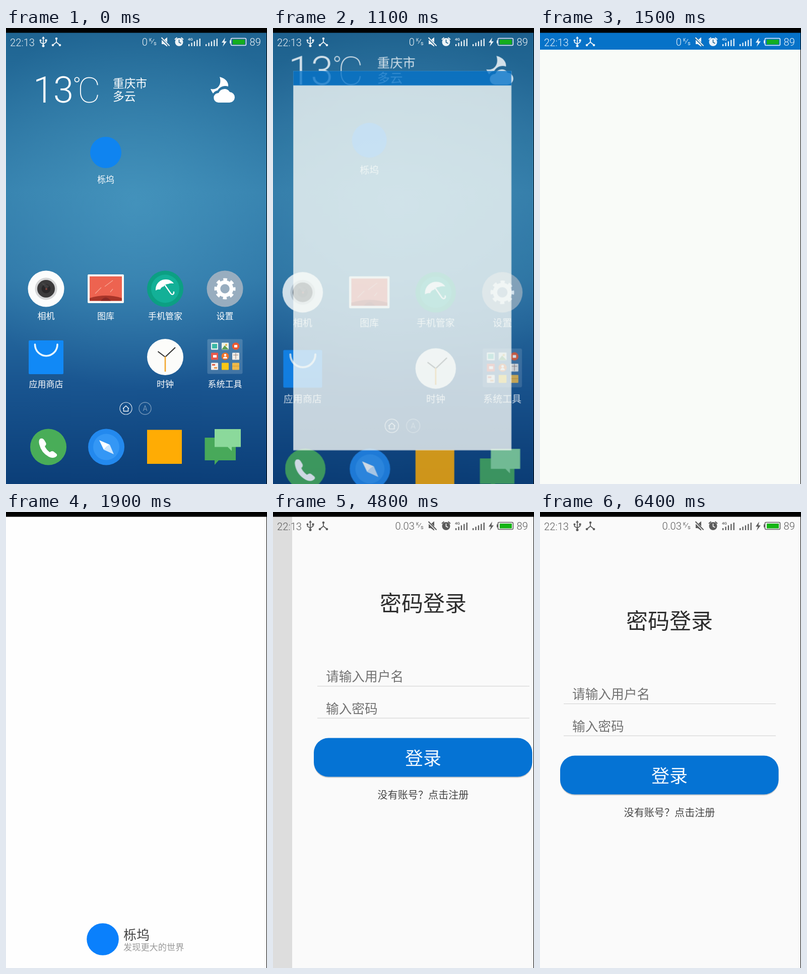
An HTML page that plays this animation: 518x905 px, repeating every 7200 ms.

```html
<!DOCTYPE html>
<html lang="zh-CN">
<head>
<meta charset="utf-8">
<title>App launch</title>
<style>
  html, body { margin: 0; width: 100%; height: 100%; overflow: hidden; background: #000; }
  svg { display: block; width: 100%; height: 100%; }
  text { font-family: "Noto Sans CJK SC", "Noto Sans CJK", "Noto Sans", sans-serif; }
  .lat { font-family: Roboto, sans-serif; }
</style>
</head>
<body>
<svg id="stage" viewBox="0 0 518 905" preserveAspectRatio="none"></svg>
<script>
const stage = document.getElementById('stage');

// Text helpers: zh is placed by its vertical centre, lat by its baseline.
const zh = (s, x, cy, size, fill = '#fff', anchor = 'middle') =>
  `<text x="${x}" y="${cy + size * 0.38}" font-size="${size}" fill="${fill}" text-anchor="${anchor}">${s}</text>`;
const lat = (s, x, y, size, extra = '') =>
  `<text class="lat" x="${x}" y="${y}" font-size="${size}" ${extra}>${s}</text>`;
const rect = (x, y, w, h, fill, extra = '') =>
  `<rect x="${x}" y="${y}" width="${w}" height="${h}" fill="${fill}" ${extra}/>`;
const disc = (x, y, r, fill, extra = '') =>
  `<circle cx="${x}" cy="${y}" r="${r}" fill="${fill}" ${extra}/>`;
const path = (d, fill, extra = '') => `<path d="${d}" fill="${fill}" ${extra}/>`;
const line = (d, color, w, extra = '') =>
  path(d, 'none', `stroke="${color}" stroke-width="${w}" ${extra}`);

const bars = (x, base) => [0, 1, 2, 3, 4].map(i => {
  const h = base + i * (15 - base) / 4;
  return rect(x + i * 5.4, 36 - h, 2.3, h, 'currentColor');
}).join('');

function statusBar() {
  const c = 'currentColor';
  return lat('22:13', 8, 36, 20.2, `fill="${c}" font-weight="300"`) +
    line('M74 19V34M68.500 25V28.500L74 32L79.500 28V24', c, 1.8) +
    path('M74 16.500L77 21H71Z', c) + disc(74, 35.500, 2.500, c) +
    disc(68.500, 24.500, 2, c) + rect(77.500, 22.500, 4, 4, c) +
    line('M100 21V28L93 34M100 28L107 34', c, 1.8) +
    disc(100, 21, 2.300, c) + disc(93, 34, 2.300, c) + disc(107, 34, 2.300, c) +
    lat('0', 281, 35, 20.2, `id="speed" fill="${c}" font-weight="300" text-anchor="end"`) +
    lat('K', 284, 26.500, 8.5, `fill="${c}"`) + lat('s', 293, 34, 11, `fill="${c}"`) +
    line('M288 31L294 22', c, 1) +
    path('M309 24H313L320 18.500V37L313 32H309Z', c) +
    line('M308 19.500L324 35.500', 'var(--under)', 4) + line('M308.500 19L324.500 35.500', c, 2) +
    disc(343.500, 28, 8, c) + line('M343.500 23V28.500L347.500 30.500', 'var(--under)', 1.6) +
    line('M335 23L339.500 19M352 23L347.500 19', c, 2.2) +
    lat('4G', 361, 25, 8, `fill="${c}" font-weight="500"`) + bars(362, 4) + bars(396, 4) +
    path('M435 19L428 29H432.500L430 37L438 26.500H433.500Z', c) +
    `<rect x="446.500" y="20.500" width="30" height="14" rx="2" fill="none" stroke="${c}" stroke-width="1.600"/>` +
    rect(444, 24.500, 2.500, 6, c) + rect(450, 23, 24, 9.500, '#14b414') +
    lat('89', 483.500, 35, 20.2, `fill="${c}" font-weight="300"`);
}

function weather() {
  return lat('13', 54, 148, 72, 'fill="#fff" font-weight="300"') +
    line('M145 102.500a4.300 4.300 0 1 1-8.600 0a4.300 4.300 0 1 1 8.600 0', '#fff', 1.8) +
    lat('C', 142, 148, 70, 'fill="#fff" font-weight="100"') +
    zh('重庆市', 212, 109, 22.7, '#fff', 'start') + zh('多云', 212, 135.500, 22.7, '#fff', 'start') +
    path('M424 97C437 100 442 109 441 116C432 113 424 117 420 124Q414 125 411 130Q408 126 406 121C420 124 429 112 424 97Z', '#fff') +
    path('M421.500 148a9.500 9.500 0 0 1 .5-19a12.300 12.300 0 0 1 22-2a10.500 10.500 0 0 1-1 21Z', '#fff');
}

function tools() {
  const tile = (i, fill) => rect(407 + (i % 3) * 21, 624.500 + Math.floor(i / 3) * 20, 14, 14, fill, 'rx="1"');
  const dot = (i, fill) => disc(414 + (i % 3) * 21, 631.500 + Math.floor(i / 3) * 20, 7.300, fill);
  return rect(399.500, 617.500, 70, 69, '#fff', 'rx="3" opacity=".17"') +
    tile(0, '#e9f3ee') + rect(409, 627, 10, 9, '#3ab8a4') +
    tile(1, '#eef2e6') + path('M428 638L434 630L442 638Z', '#5d9f55') + disc(437, 629, 2, '#e8b645') +
    dot(2, '#ea5930') + rect(453, 629, 6, 5, '#fff') +
    tile(3, '#e8584a') + rect(411, 649, 7, 5, '#fff') +
    dot(4, '#f07127') + disc(435, 649, 2.300, '#fff') + path('M431 656a4 4 0 0 1 8 0Z', '#fff') +
    tile(5, '#f3eee7') + line('M451 649H461M456 645V657', '#94807a', 1) +
    tile(6, '#f6efe9') + rect(409, 667, 6, 3, '#dd6048') + rect(413, 673, 6, 3, '#e39a55') +
    tile(7, '#fac714') + tile(8, '#eeb94a') + line('M449 671H463', '#d49a2e', 1);
}

function home() {
  const hand = 'stroke-linecap="round"';
  return weather() +
    disc(198, 247, 31, '#0f84f0') + zh('栎坞', 198, 300.500, 17) +
    // camera, gallery
    disc(79.500, 517.500, 36, '#fbfcfc') + disc(79.500, 517.500, 22, '#d5d6d7') +
    disc(79.500, 517.500, 17.500, '#3b3a3b') + disc(79.500, 517.500, 9, '#292729') +
    path('M70 505L86 512L80 518Z', '#555', 'opacity=".5"') + disc(80, 518, 2, '#80423a') +
    zh('相机', 79.500, 571.500, 17) +
    rect(162, 489, 72, 57, '#fbf8f4', 'rx="2"') + rect(166, 493, 64, 48.500, '#ed6350') +
    path('M166 541.500V536Q198 526 230 536V541.500Z', '#a93529') +
    path('M188 541.500Q198 528 208 541.500Z', '#8c2a25') +
    line('M177 527L189 515M196 513L212 501M207 524L212 518', '#f6a795', 1.2) +
    zh('图库', 198, 571.500, 17) +
    // manager, settings
    disc(316, 517.500, 36, '#0c9f83') + disc(316, 517.500, 28, '#13b097') +
    path('M297 521C296 508 306 498 318 499C326 499 331 504 333 507Q326 506 322 508Q316 508 313 513Q308 514 306 519Q301 518 297 521Z', '#fff') +
    line('M316 511L327 527Q331 531 333 526.500V524', '#fff', 2.4, hand) +
    zh('手机管家', 316, 571.500, 17) +
    disc(434.500, 517.500, 36, '#98adbf') + disc(434.500, 517.500, 13, 'none', 'stroke="#fff" stroke-width="7.500"') +
    disc(434.500, 517.500, 18.500, 'none', 'stroke="#fff" stroke-width="5" stroke-dasharray="7.530 7" stroke-dashoffset="3.760"') +
    zh('设置', 434.500, 571.500, 17) +
    // store, clock, tools
    rect(45, 620, 69, 67, '#1189f6', 'rx="2"') +
    line('M57.500 628A22 22.500 0 0 0 102 628', '#e5f5ff', 3.6, hand) + zh('应用商店', 79.500, 707, 17) +
    disc(316, 653, 36, '#fcfcfa') + line('M301.500 642L316 653L336 634', '#2d2d2d', 2) +
    line('M316 652V682', '#f2a72f', 2.6) + zh('时钟', 316, 707, 17) +
    tools() + zh('系统工具', 434.500, 707, 17) +
    // page marks
    disc(238, 755, 12, 'none', 'stroke="#fff" stroke-width="1.200" opacity=".85"') +
    line('M232 755.500L238 750L244 755.500M233.500 754V760.500H242.500V754', '#fff', 1.3) +
    `<g opacity=".4">${disc(276, 755, 12, 'none', 'stroke="#fff" stroke-width="1.400"')}` +
    `${lat('A', 276, 760, 14, 'fill="#fff" text-anchor="middle"')}</g>` +
    // dock
    disc(84, 831.500, 36, '#49ad58') +
    path('M68 815q5-2 8 3l3 5q2 4-2 7q3 7 10 12q4-4 8-1l5 4q3 3-1 6q-6 4-14 0q-15-8-19-25q-2-8 2-11z', '#fff') +
    disc(199, 831.500, 36, '#2389ee') + disc(199, 831.500, 26, '#3497f5') +
    path('M185 818L206 827L199 831.500L194 837Z', '#fff') + path('M214 846L194 837L199 831.500L206 827Z', '#cfe8ff') +
    rect(280, 797.500, 69, 67.500, '#ffac04') +
    path('M394.500 813H456V858H422L414 867V858H394.500Z', '#48a95a') +
    path('M414 796H466V831.500H448V839.500L440 831.500H414Z', '#8bd99b');
}

function login() {
  return rect(-3, 0, 530, 960, '#fafafa') +
    zh('密码登录', 257, 216, 43, '#2e2e2e') +
    zh('请输入用户名', 64, 361.500, 25.7, '#727272', 'start') + rect(47, 380, 421, 1.200, '#d6d6d6') +
    zh('输入密码', 64, 425, 25.7, '#727272', 'start') + rect(47, 443.500, 421, 1.200, '#d6d6d6') +
    rect(40, 485.500, 433.500, 77, '#000', 'rx="29" opacity=".18"') +
    rect(40, 483.500, 433.500, 77, '#0573d4', 'rx="29"') + zh('登录', 257, 523, 36, '#f3f9ff') +
    zh('没有账号？点击注册', 257, 596, 20.1, '#444');
}

const group = (id, body) => `<g id="${id}">${body}</g>`;
stage.innerHTML = `<defs>
  <linearGradient id="sky" x1="0" y1="0" x2="0" y2="1">
    <stop offset="0" stop-color="#1e6391"/><stop offset=".36" stop-color="#347fac"/>
    <stop offset=".55" stop-color="#2e76a7"/><stop offset=".78" stop-color="#195590"/>
    <stop offset="1" stop-color="#0b3e78"/>
  </linearGradient>
  <radialGradient id="glow" gradientUnits="userSpaceOnUse" cx="258" cy="350" r="370">
    <stop offset="0" stop-color="#50a2c8" stop-opacity=".55"/><stop offset="1" stop-color="#50a2c8" stop-opacity="0"/>
  </radialGradient></defs>` +
  rect(0, 0, 518, 905, 'url(#sky)') + rect(0, 0, 518, 905, 'url(#glow)') +
  rect(0, 0, 518, 905, '#04243f', 'id="dim"') +
  group('home', home()) +
  // the window is drawn around its own centre
  group('win', rect(-258.5, -449.5, 517, 899, '#f9fbf8') + rect(-258.5, -449.5, 517, 34.5, '#0672c8')) +
  group('splash', rect(0, 0, 518, 905, '#fefefe') + disc(192, 848, 31.800, '#0a80fc') +
    zh('栎坞', 233, 839, 26, '#444', 'start') + zh('发现更大的世界', 233, 863.500, 17.2, '#999', 'start')) +
  rect(0, 0, 518, 905, '#000', 'id="shade"') +
  group('login', login()) +
  group('status', statusBar()) +
  rect(0, 0, 518, 9.500, '#000') + rect(517, 0, 1, 905, '#000');

const $ = {};
stage.querySelectorAll('[id]').forEach(el => $[el.id] = el);

// Piecewise linear value from [time, value] pairs.
function track(t, ...keys) {
  if (t <= keys[0][0]) return keys[0][1];
  for (let i = 1; i < keys.length; i++) {
    const [t0, a] = keys[i - 1], [t1, b] = keys[i];
    if (t < t1) return a + (b - a) * (t - t0) / (t1 - t0);
  }
  return keys[keys.length - 1][1];
}
const show = (el, alpha) => {
  el.setAttribute('opacity', alpha);
  el.setAttribute('display', alpha > 0 ? 'inline' : 'none');
};

function draw(t) {
  show($.home, track(t, [900, 1], [1100, 0.8], [1200, 0.3], [1300, 0]));
  const zoom = track(t, [900, 1], [1000, 1.03], [1100, 1.116], [1200, 1.256], [1300, 1.33]);
  $.home.setAttribute('transform', `translate(257 457) scale(${zoom}) translate(-257 -457)`);
  show($.dim, track(t, [900, 0], [1100, 0.05], [1200, 0.08]));

  const size = t < 1400 ? 1 - 0.1625 * Math.pow(0.37, (t - 1100) / 100) : 1;
  const cx = track(t, [1200, 256.5], [1400, 258.5]);
  const cy = track(t, [1200, 461.5], [1400, 458]);
  $.win.setAttribute('transform', `translate(${cx} ${cy}) scale(${size})`);
  show($.win, track(t, [900, 0], [1000, 0.3], [1100, 0.78], [1200, 1]));

  const slide = track(t, [4600, 518], [4700, 200], [4800, 41], [4900, 9], [5000, 0]);
  show($.splash, track(t, [1600, 0], [1900, 1]));
  $.splash.setAttribute('transform', `translate(${-(518 - slide) * 0.25} 0)`);
  show($.shade, (518 - slide) / 518 * 0.14);

  const inLogin = t > 4600;
  show($.login, inLogin ? 1 : 0);
  $.login.setAttribute('transform', `translate(${slide} ${t < 5000 ? -35 : 0})`);

  show($.status, inLogin ? 1 : track(t, [1600, 0.92], [1900, 0]));
  $.status.setAttribute('color', inLogin ? '#5c5c5c' : '#fff');
  $.status.style.setProperty('--under', inLogin ? '#fafafa' : '#22648f');
  $.speed.textContent = inLogin ? '0.03' : '0';
}

const start = performance.now();
function tick() {
  draw(Math.floor((performance.now() - start) % 7200 / 100) * 100);
  requestAnimationFrame(tick);
}
tick();
</script>
</body>
</html>
```
